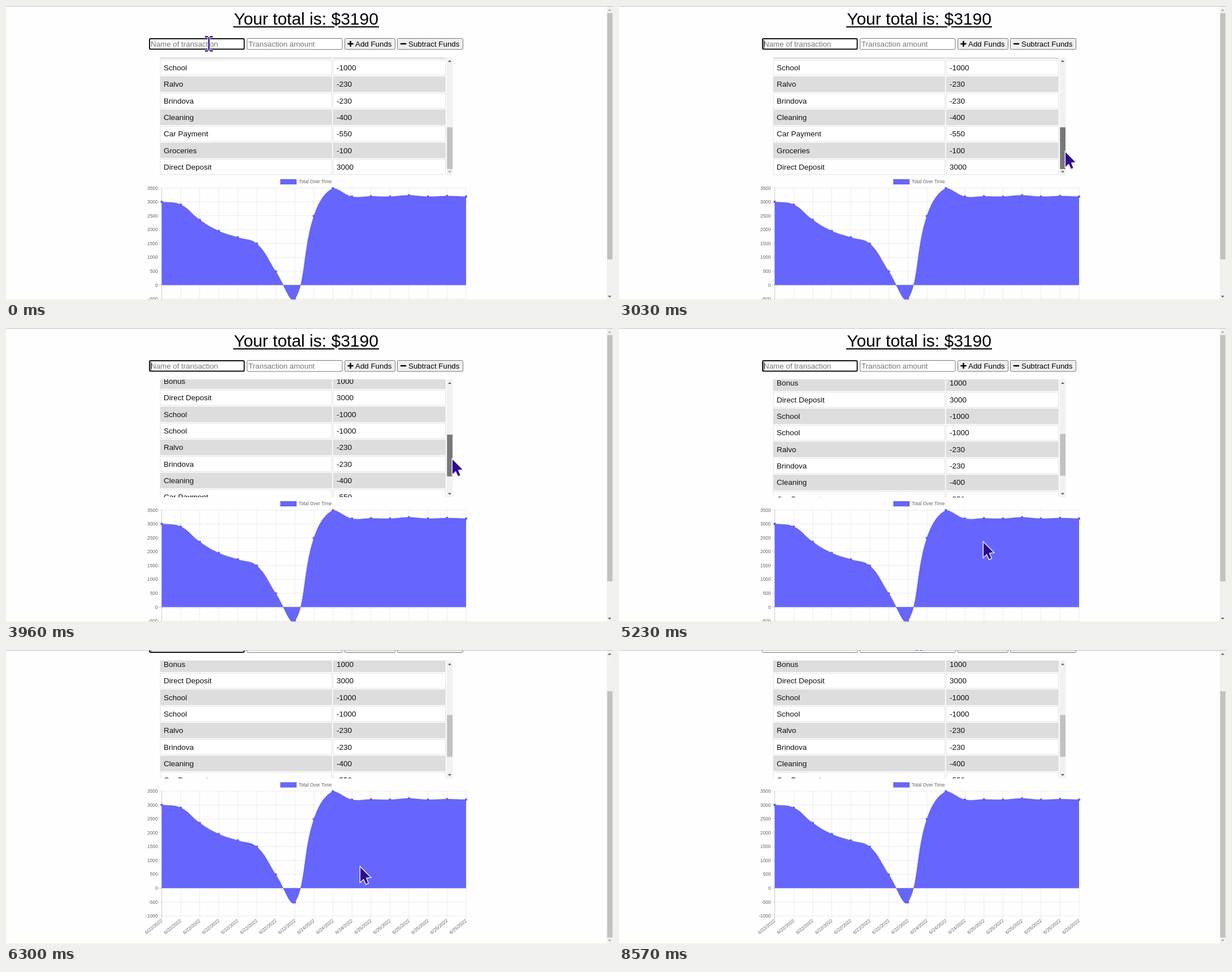
These frames come from a looping animation (1074 px wide and 521 px high, 8.73 s). An HTML page with a canvas:

```html
<!DOCTYPE html>
<html lang="en">
<head>
<meta charset="utf-8">
<title>Budget tracker</title>
<style>
  html, body { margin: 0; width: 100%; height: 100%; overflow: hidden; background: #fefefe; }
  canvas { display: block; }
</style>
</head>
<body>
<canvas id="stage" width="1074" height="521"></canvas>
<script>
const ctx = document.getElementById('stage').getContext('2d');
const W = 1074, H = 521, LOOP = 8730;
const FONT = 'Arial, "Liberation Sans", sans-serif';
const BLUE = '#6666ff', PURPLE = '#2e0a91';

const rows = [
  ['Bonus', 1000], ['Direct Deposit', 3000], ['School', -1000], ['School', -1000],
  ['Ralvo', -230], ['Brindova', -230], ['Cleaning', -400], ['Car Payment', -550],
  ['Groceries', -100], ['Direct Deposit', 3000]
];
const totals = [3000, 2900, 2350, 1950, 1720, 1490, 490, -510, 2490, 3490,
  3190, 3200, 3190, 3235, 3190, 3210, 3190];
const dayOf = i => i < 8 ? 22 : i < 11 ? 24 : 25;

// Pointer path: time, x, y, and 1 where the way there is linear.
const path = [
  [920, 359, 67], [1000, 362, 60], [1760, 771, 350], [2150, 771, 350],
  [2690, 789, 258], [3030, 789, 258], [3460, 788, 244.1, 1], [3880, 789, 232.4, 1],
  [4110, 789, 230.7], [4420, 789, 230.7], [5230, 644, 379], [5900, 644, 379],
  [6300, 626, 384], [6880, 360, 489], [7150, 360, 489], [7300, 378, 484],
  [7570, 378, 484], [8420, 531, 3], [8570, 531, -13]
];
const caretFlips = [730, 1230, 1730, 2230, 2690, 4480, 4980, 5480, 5980, 6480, 7150, 7300, 7800, 8300];
const DRAG = [3030, 4110], BLUR = 8460, SCROLL = [5460, 5800];
const MAX_PAGE = 72.5, DRAG_RATIO = 2.8;

const clamp = (v, a, b) => Math.min(b, Math.max(a, v));
const smooth = u => u * u * (3 - 2 * u);
const mix = (a, b, u) => a + (b - a) * u;

function pointerAt(t) {
  const k = path.findIndex(p => p[0] > t);
  if (k === 0) return { x: path[0][1], y: path[0][2] };
  if (k < 0) { const p = path[path.length - 1]; return { x: p[1], y: p[2] }; }
  const a = path[k - 1], b = path[k];
  const u = (t - a[0]) / (b[0] - a[0]), e = b[3] ? u : smooth(u);
  return { x: mix(a[1], b[1], e), y: mix(a[2], b[2], e) };
}

function rect(x, y, w, h, color) {
  ctx.fillStyle = color;
  ctx.fillRect(x, y, w, h);
}

function text(s, x, y, size, color, align = 'left') {
  ctx.font = `${size}px ${FONT}`;
  ctx.fillStyle = color;
  ctx.textAlign = align;
  ctx.fillText(s, x, y);
}

function line(points, color, width) {
  ctx.beginPath();
  points.forEach(([x, y], i) => i ? ctx.lineTo(x, y) : ctx.moveTo(x, y));
  ctx.strokeStyle = color;
  ctx.lineWidth = width;
  ctx.stroke();
}

function box(x, y, w, h, fill, border, width = 1) {
  ctx.beginPath();
  ctx.roundRect(x, y, w, h, 2);
  ctx.fillStyle = fill;
  ctx.fill();
  ctx.strokeStyle = border;
  ctx.lineWidth = width;
  ctx.stroke();
}

function triangle(x, y, dir, enabled) {
  ctx.beginPath();
  ctx.moveTo(x - 3, y + 1.5 * dir);
  ctx.lineTo(x + 3, y + 1.5 * dir);
  ctx.lineTo(x, y - 1.5 * dir);
  ctx.fillStyle = enabled ? '#505050' : '#a3a3a3';
  ctx.fill();
}

function drawForm(focused, caret) {
  text('Your total is: $3190', 531, 33, 30, '#000', 'center');
  rect(402, 36, 179, 2, '#000');
  rect(588, 36, 72, 2, '#000');

  if (focused) box(254, 58, 167.5, 18.5, '#fff', '#101010', 2);
  else box(253.5, 57.5, 168.5, 19.5, '#fff', '#767676');
  box(426.5, 57.5, 168.5, 19.5, '#fff', '#767676');
  text('Name of transaction', 256, 72, 13.333, '#757575');
  text('Transaction amount', 429, 72, 13.333, '#757575');
  if (caret) rect(256, 60, 1, 15, '#000');

  box(599.5, 57.5, 89, 19.5, '#efefef', '#767676');
  box(692.5, 57.5, 116, 19.5, '#efefef', '#767676');
  text('Add Funds', 618, 72, 13.333, '#000');
  text('Subtract Funds', 712, 72, 13.333, '#000');
  ctx.lineCap = 'round';
  line([[605.5, 67], [613.5, 67]], '#000', 2.6);
  line([[609.5, 63], [609.5, 71]], '#000', 2.6);
  line([[699, 67], [707, 67]], '#000', 2.6);
  ctx.lineCap = 'butt';
}

function drawCell(x, w, mid, shaded) {
  if (shaded) return rect(x, mid - 13.8, w, 27.7, '#dddddd');
  rect(x, mid - 13.8, w, 27.7, '#fff');
  ctx.strokeStyle = '#e2e2e2';
  ctx.lineWidth = 1;
  ctx.strokeRect(x + .5, mid - 13.3, w - 1, 26.7);
}

function drawTable(up, thumbColor) {
  ctx.save();
  ctx.beginPath();
  ctx.rect(272, 91, 519, 209);
  ctx.clip();
  rows.forEach(([name, amount], i) => {
    const mid = 285.2 - (9 - i) * 29.33 + up * DRAG_RATIO;
    drawCell(272.5, 304.5, mid, i % 2 === 0);
    drawCell(578.5, 199.5, mid, i % 2 === 0);
    text(name, 279, mid + 4.8, 13.5, '#111');
    text(String(amount), 585, mid + 4.8, 13.5, '#111');
  });
  rect(779.5, 91, 11, 209, '#f1f1f1');
  rect(780.3, 215 - up, 9.7, 74, thumbColor);
  triangle(785, 97.5, 1, true);
  triangle(785, 294, -1, up > 0);
  ctx.restore();
}

// Chart geometry
const CH = { left: 275.5, right: 814, top: 322.5, bottom: 543.6, zero: 494.5 };
const stepX = (CH.right - CH.left) / (totals.length - 1);
const valueY = v => CH.zero - v * 172 / 3500;
const pts = totals.map((v, i) => ({ x: CH.left + i * stepX, y: valueY(v) }));

// Cardinal-style control points, kept inside the chart area.
pts.forEach((p, i) => {
  const a = pts[i - 1] || p, b = pts[i + 1] || p;
  const d0 = Math.hypot(p.x - a.x, p.y - a.y), d1 = Math.hypot(b.x - p.x, b.y - p.y);
  const handle = k => ({
    x: clamp(p.x + k * (b.x - a.x), CH.left, CH.right),
    y: clamp(p.y + k * (b.y - a.y), CH.top, CH.bottom)
  });
  p.before = handle(-.4 * d0 / (d0 + d1));
  p.after = handle(.4 * d1 / (d0 + d1));
});

function traceCurve() {
  ctx.beginPath();
  ctx.moveTo(pts[0].x, pts[0].y);
  for (let i = 1; i < pts.length; i++) {
    const a = pts[i - 1].after, p = pts[i], b = p.before;
    ctx.bezierCurveTo(a.x, a.y, b.x, b.y, p.x, p.y);
  }
}

function drawChart() {
  rect(485.5, 307, 28.5, 9, BLUE);
  ctx.strokeStyle = 'rgba(0,0,0,.1)';
  ctx.lineWidth = 1.5;
  ctx.strokeRect(485.5, 307, 28.5, 9);
  text('Total Over Time', 518, 314, 8.3, '#666');

  for (let v = -1000; v <= 3500; v += 500) {
    const y = valueY(v);
    line([[CH.left - 6, y], [CH.right, y]], v ? 'rgba(0,0,0,.1)' : 'rgba(0,0,0,.25)', .8);
    text(String(v), 268.5, y + 3, 8.3, '#666', 'right');
  }
  pts.forEach((p, i) => {
    line([[p.x, CH.top], [p.x, CH.bottom + 6]], i ? 'rgba(0,0,0,.1)' : 'rgba(0,0,0,.25)', .8);
    ctx.save();
    ctx.translate(p.x, CH.bottom + 7.3);
    ctx.rotate(-.68);
    text(`6/${dayOf(i)}/2022`, 0, 3, 8.3, '#666', 'right');
    ctx.restore();
  });

  traceCurve();
  ctx.lineTo(CH.right, CH.zero);
  ctx.lineTo(CH.left, CH.zero);
  ctx.fillStyle = BLUE;
  ctx.fill();
  traceCurve();
  ctx.strokeStyle = 'rgba(0,0,0,.1)';
  ctx.lineWidth = 2;
  ctx.stroke();
  for (const p of pts) {
    ctx.beginPath();
    ctx.arc(p.x, p.y, 2.2, 0, 7);
    ctx.fillStyle = '#6161f2';
    ctx.fill();
  }
}

function drawWindow(scroll) {
  rect(1063, 0, 11, H, '#f1f1f1');
  rect(1063.7, 12.5 + scroll * .835, 9.3, 436.5, '#c1c1c1');
  triangle(1068, 7, 1, scroll > 0);
  triangle(1068, 515, -1, scroll < MAX_PAGE);
  rect(0, 0, W, 1, '#b4c3d0');
  rect(0, 520, W, 1, '#fbf0cf');
}

function drawArrow() {
  ctx.beginPath();
  ctx.moveTo(1, 1);
  for (const [x, y] of [[1, 27], [6.8, 21.5], [11, 30.5], [14.6, 29], [10.8, 19.6], [18.5, 18.8]]) ctx.lineTo(x, y);
  ctx.closePath();
  ctx.strokeStyle = '#fff';
  ctx.lineWidth = 2.6;
  ctx.stroke();
  ctx.fillStyle = PURPLE;
  ctx.fill();
}

function drawBeam() {
  for (const [color, width] of [['#fff', 4.6], [PURPLE, 2.4]]) {
    line([[0, -11.5], [0, 11.5]], color, width);
    for (const y of [-12.5, 12.5]) {
      line([[-7, y], [-1.5, y]], color, width);
      line([[1.5, y], [7, y]], color, width);
    }
  }
}

function draw(t) {
  const ptr = pointerAt(t);
  const scroll = MAX_PAGE * smooth(clamp((t - SCROLL[0]) / (SCROLL[1] - SCROLL[0]), 0, 1));
  const drag = pointerAt(clamp(t, ...DRAG));
  const up = 258 - drag.y;
  const pageY = ptr.y + scroll;
  const dragging = t >= DRAG[0] && t < DRAG[1];
  const hover = ptr.x > 780 && ptr.x < 791 && pageY > 215 - up && pageY < 289 - up;
  const focused = t < BLUR;
  const caret = focused && caretFlips.filter(f => f <= t).length % 2 === 1;

  rect(0, 0, W, H, '#fefefe');
  ctx.save();
  ctx.translate(0, -scroll);
  drawForm(focused, caret);
  drawTable(up, dragging ? '#787878' : hover ? '#a8a8a8' : '#c1c1c1');
  drawChart();
  ctx.restore();
  drawWindow(scroll);

  ctx.save();
  ctx.translate(ptr.x, ptr.y);
  const overInput = pageY > 57 && pageY < 78 && ptr.x > 253 && ptr.x < 595;
  if (overInput) drawBeam(); else drawArrow();
  ctx.restore();
}

const start = performance.now();
function tick() {
  draw((performance.now() - start) % LOOP);
  requestAnimationFrame(tick);
}
tick();
</script>
</body>
</html>
```
